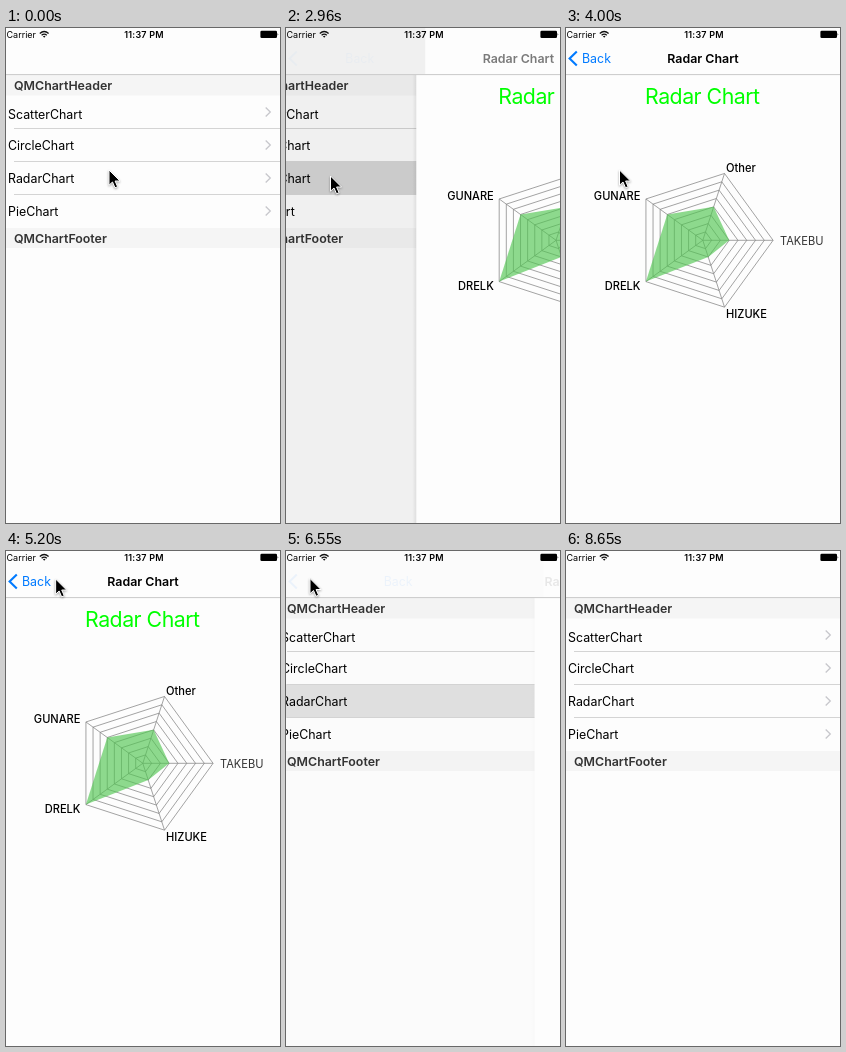
Recreate the animation shown at these times as an HTML page. Size 274 by 495 pixels, loop 9700 ms.

```html
<!DOCTYPE html>
<html lang="en">
<head>
<meta charset="utf-8">
<title>Radar chart demo</title>
<style>
  html, body { margin: 0; width: 100%; height: 100%; overflow: hidden; background: #fdfdfd; }
  svg { display: block; width: 274px; height: 495px; }
  text { font: 12.4px Inter, "Liberation Sans", sans-serif; }
  .bold { font-weight: 600; }
  .head { font-weight: 600; fill: #333; }
  .label { font-size: 11.1px; font-weight: 500; }
  .light { font-weight: 400; fill: #333; }
  .status { font-size: 9px; }
  .big { font-size: 21.3px; letter-spacing: -.5px; fill: #0f0; }
  .line { fill: none; stroke: #848484; stroke-width: .75; }
  #cursor { filter: drop-shadow(0 1px 1px rgba(0, 0, 0, .35)); }
</style>
</head>
<body>
<svg viewBox="0 0 274 495">
  <defs>
    <linearGradient id="edge">
      <stop offset="0" stop-color="#000" stop-opacity="0"/>
      <stop offset="1" stop-color="#000" stop-opacity=".09"/>
    </linearGradient>
  </defs>

  <g id="list">
    <rect width="380" height="495" fill="#fdfdfd"/>
    <rect y="47" width="274" height="20.5" fill="#f5f5f5"/>
    <rect y="200" width="274" height="20" fill="#f5f5f5"/>
    <text class="head" x="8" y="62">QMChartHeader</text>
    <text class="head" x="8" y="215">QMChartFooter</text>
    <g id="lines" stroke="#d0d0d0" stroke-width=".9"></g>
    <rect id="pick" y="133" width="274" height="34" fill="#d6d6d6"/>
    <g id="rows"></g>
  </g>
  <rect id="dim" width="274" height="495"/>

  <g id="page">
    <rect id="shadow" x="-7" width="5" height="495" fill="url(#edge)"/>
    <rect x="-3" width="280" height="495" fill="#fdfdfd"/>
    <text class="big" x="136.3" y="76" text-anchor="middle">Radar Chart</text>
    <g id="radar"></g>
    <text class="label light" x="214" y="217">TAKEBU</text>
    <text class="label" x="160" y="144">Other</text>
    <text class="label" x="74.5" y="171.5" text-anchor="end">GUNARE</text>
    <text class="label" x="74.5" y="262" text-anchor="end">DRELK</text>
    <text class="label" x="160" y="290">HIZUKE</text>
  </g>

  <rect width="274" height="47" fill="#fdfdfd"/>
  <rect id="navDim" height="46"/>
  <path d="M0 46.6H274" stroke="#c4c4c4" stroke-width=".9"/>
  <g id="back" fill="#007aff">
    <path d="M10.8 23.6L3.6 30.5L10.8 37.4" fill="none" stroke="#007aff" stroke-width="2.1"/>
    <text id="backText" x="16" y="35">Back</text>
  </g>
  <text id="title" class="bold" x="137" y="35" text-anchor="middle">Radar Chart</text>

  <text class="status" x="0.5" y="9.8">Carrier</text>
  <g fill="none" stroke="#111" stroke-width="1.3">
    <path d="M33.8 5.4Q38.2 1.6 42.6 5.4M35.6 7.3Q38.2 5.1 40.8 7.3"/>
    <path d="M36.9 8.2L38.2 9.8L39.5 8.2Q38.2 7.3 36.9 8.2Z" fill="#111" stroke="none"/>
  </g>
  <text class="status bold" x="138" y="9.8" text-anchor="middle" letter-spacing=".2">11:37 PM</text>
  <rect x="254.4" y="2.8" width="16.6" height="7.2" rx="1.3"/>
  <path d="M271.6 5Q273 6.4 271.6 7.8Z"/>

  <path id="cursor" d="M0 0V15.2L3.5 12L6 17.8L8.6 16.7L6.1 11H11Z"
        stroke="#fff" stroke-width="1" stroke-linejoin="round"/>
</svg>
<script>
const LOOP = 9700;
const NS = 'http://www.w3.org/2000/svg';
const $ = id => document.getElementById(id);
const clamp = v => Math.min(1, Math.max(0, v));

function add(parent, tag, attrs, text = '') {
  const el = document.createElementNS(NS, tag);
  for (const k in attrs) el.setAttribute(k, attrs[k]);
  el.textContent = text;
  $(parent).append(el);
}

// List rows
['ScatterChart', 'CircleChart', 'RadarChart', 'PieChart'].forEach((name, i) => {
  const mid = 84 + 33 * i;
  add('rows', 'text', { x: 2, y: mid + (i ? 4.5 : 6.5) }, name);
  add('rows', 'path', {
    d: `M259.7 ${mid - 4.5}l4.6 4.5l-4.6 4.5`, fill: 'none', stroke: '#c7c7cc', 'stroke-width': 1.3
  });
  if (i < 3) add('lines', 'path', { d: `M8 ${mid + 16.5}H274` });
});

// Radar: five axes, eight rings
const RINGS = 8, CX = 136.8, CY = 212.3, RADIUS = 70.3;
const spot = (axis, value) => {
  const a = -axis * Math.PI * 2 / 5, r = RADIUS * value / RINGS;
  return `${CX + r * Math.cos(a)},${CY + r * Math.sin(a)}`;
};
const polygon = (values, attrs) =>
  add('radar', 'polygon', { points: values.map((v, i) => spot(i, v)).join(' '), ...attrs });
for (let n = 1; n <= RINGS; n++) polygon(Array(5).fill(n), { class: 'line' });
for (let i = 0; i < 5; i++) add('radar', 'path', { d: `M${CX},${CY}L${spot(i, RINGS)}`, class: 'line' });
polygon([3, 4, 5, 8, 2], { fill: '#52c752', 'fill-opacity': .65 });

// Pointer glides through a few points, resting in between
const glides = [
  { from: 150, to: 1480, path: [[103, 142], [98, 136], [68, 153], [35.5, 159]] },
  { from: 1480, to: 2220, path: [[35.5, 159], [55, 152], [44.5, 148]] },
  { from: 3850, to: 4150, path: [[44.5, 148], [53.5, 142], [74, 135]] },
  { from: 4450, to: 5650, path: [[74, 135], [145, 168], [36, 8], [24, 27.5]] },
  { from: 6700, to: 7000, path: [[24, 27.5], [65, 179]] },
  { from: 7150, to: 7450, path: [[65, 179], [84, 186], [79, 192]] },
  { from: 8050, to: 8500, path: [[79, 192], [55, 377], [35, 468], [179, 413]] }
];
const POINTER_GONE = 8650;

function pointer(t) {
  const { from, to, path } = glides.findLast(g => g.from <= t) || glides[0];
  const pos = clamp((t - from) / (to - from)) * (path.length - 1);
  const i = Math.min(Math.floor(pos), path.length - 2);
  return path[i].map((v, k) => v + (path[i + 1][k] - v) * (pos - i));
}

// Critically damped spring from 1 to 0
function spring(dt) {
  const x = Math.max(0, dt) / 72;
  return x > 7 ? 0 : (1 + x) * Math.exp(-x);
}

const PUSH = 2836, PRESS = 6100, POP = 6252, UNPICKED = 7000;
const hold = t => t < 3996 ? Math.floor((t + 4) / 148) * 148 : 4000 + Math.floor((t - 4000) / 150) * 150;

const move = (id, x, y = 0) => $(id).setAttribute('transform', `translate(${x} ${y})`);
const fade = (id, v) => $(id).setAttribute('opacity', clamp(v));

function draw(t) {
  // Distance of the chart page from rest, 1 = fully off to the right
  const r = t < POP ? spring(t - PUSH) : 1 - spring(t - POP);
  const shown = 1 - r;
  move('cursor', ...pointer(t));
  move('list', -85 * shown);
  move('page', shown ? 274 * r : 300);
  move('title', 224 * r - 57.5 * r * r);
  move('backText', 89 * r);
  fade('cursor', t < POINTER_GONE ? 1 : 0);
  fade('title', shown);
  fade('back', t < PRESS ? 1 - 2 * r : .2 * Math.sqrt(shown));
  fade('pick', t < PUSH ? 0 : (UNPICKED - t) / 650);
  fade('shadow', 2 * shown);
  fade('dim', .1 * shown);
  fade('navDim', .1 * shown);
  $('navDim').setAttribute('width', r ? Math.min(274, 274 * r + 6) : 0);
}

const start = performance.now();
function tick() {
  draw(hold((performance.now() - start) % LOOP));
  requestAnimationFrame(tick);
}
tick();
</script>
</body>
</html>
```
